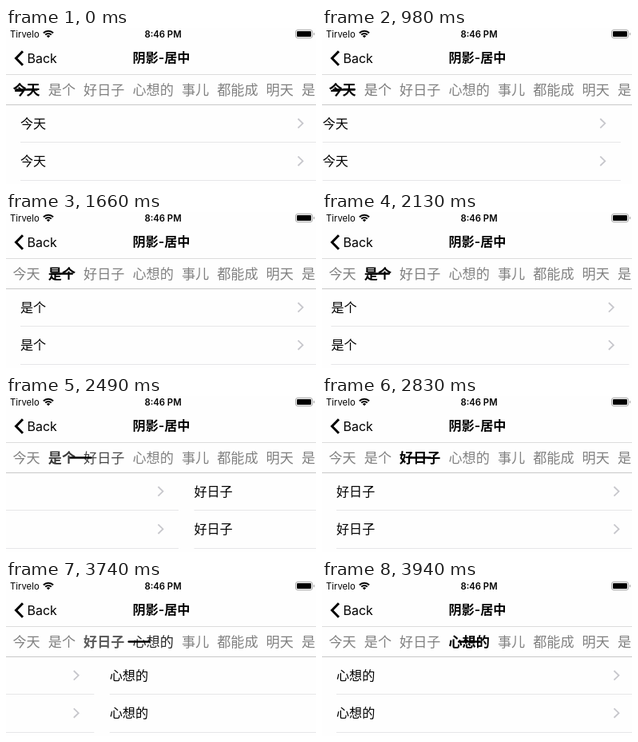
Recreate the animation shown at these times as an HTML page with a canvas. Size 388x196 px, loop 4940 ms.

```html
<!DOCTYPE html>
<html lang="zh">
<head>
<meta charset="utf-8">
<title>阴影-居中</title>
<style>
  html, body { margin: 0; width: 100%; height: 100%; overflow: hidden; background: #fefefe; }
  canvas { display: block; width: 388px; height: 196px; }
</style>
</head>
<body>
<canvas id="stage"></canvas>
<script>
const W = 388, H = 196, PAGE = 392.5, LOOP = 4940;
const FONT = 'Inter, "Noto Sans CJK SC", "Noto Sans CJK", sans-serif';
const EM = 17.1, GAP = 10.1, BAR = 28.5, GRAY = 128;

const canvas = document.getElementById('stage');
const ctx = canvas.getContext('2d');
const dpr = window.devicePixelRatio || 1;
canvas.width = W * dpr;
canvas.height = H * dpr;

let left = 8.5;
const tabs = ['今天', '是个', '好日子', '心想的', '事儿', '都能成', '明天', '是'].map(label => {
  const width = label.length * EM;
  const tab = { label, x: left, mid: left + width / 2 };
  left += width + GAP;
  return tab;
});

const drag = u => u ** 2.8;
const settle = u => 1 - (1 - u ** 1.5) ** 3;

// Each swipe: a quick drag, a pause, then the page settles.
const swipes = [
  { pull: [980, 1040, 2], hold: 120, release: [1300, 1660, 10] },
  { pull: [2080, 2190, 3], hold: 143.5, release: [2490, 2830, 8] },
  { pull: [3190, 3310, 3], hold: 148, release: [3630, 3940, 8] }
];

function progress(t, [start, end, steps]) {
  if (t < start) return 0;
  if (t >= end) return 1;
  return (Math.floor((t - start) / (end - start) * (steps - 1) + 1e-6) + 1) / steps;
}

function scrollAt(t) {
  return swipes.reduce((sum, s) =>
    sum + s.hold * drag(progress(t, s.pull)) +
    (PAGE - s.hold) * settle(progress(t, s.release)), 0);
}

function text(str, x, y, size, color = '#000', weight = 400, align = 'left') {
  ctx.font = `${weight} ${size}px ${FONT}`;
  ctx.fillStyle = color;
  ctx.textAlign = align;
  ctx.fillText(str, x, y);
}

function rect(x, y, w, h, color) {
  ctx.fillStyle = color;
  ctx.fillRect(x, y, w, h);
}

function chevron(x, y, dx, dy, width, color) {
  ctx.beginPath();
  ctx.moveTo(x - dx, y - dy);
  ctx.lineTo(x, y);
  ctx.lineTo(x - dx, y + dy);
  ctx.lineWidth = width;
  ctx.strokeStyle = color;
  ctx.stroke();
}

function pill(x, y, w, h, r) {
  ctx.beginPath();
  ctx.roundRect(x, y, w, h, r);
}

function statusBar() {
  text('Tirvelo', 5, 12, 11.3);
  ctx.strokeStyle = ctx.fillStyle = '#000';
  ctx.lineWidth = 2;
  for (const r of [8.6, 5.3]) {
    ctx.beginPath();
    ctx.arc(53, 12.3, r, -Math.PI * 0.75, -Math.PI * 0.25);
    ctx.stroke();
  }
  ctx.beginPath();
  ctx.moveTo(53, 12.3);
  ctx.arc(53, 12.3, 3, -Math.PI * 0.75, -Math.PI * 0.25);
  ctx.fill();

  text('8:46 PM', 196.5, 12, 11.3, '#000', 600, 'center');

  ctx.strokeStyle = '#a6a6a6';
  ctx.lineWidth = 1;
  pill(362.5, 2.5, 21, 10, 2.5);
  ctx.stroke();
  ctx.fillStyle = '#000';
  pill(364, 4, 18, 7, 1.3);
  ctx.fill();
  rect(385, 6, 1, 3, '#a6a6a6');
}

function navBar() {
  chevron(12.5, 38, -8.5, 8.7, 3, '#000');
  text('Back', 26.5, 43.7, 16);
  text('阴影-居中', 194.5, 43.4, 16.1, '#000', 600, 'center');
  rect(0, 58, W, 1, '#dcdcdc');
}

function tabBar(pos) {
  const from = Math.floor(pos), part = pos - from;
  tabs.forEach((tab, i) => {
    const near = Math.max(0, 1 - Math.abs(pos - i));
    const c = Math.round(GRAY * (1 - near));
    text(tab.label, tab.x, 84.3, EM, `rgb(${c},${c},${c})`, i === from ? 600 : 400);
  });
  const a = tabs[from].mid, b = tabs[from + 1].mid;
  ctx.fillStyle = '#000';
  pill(a + (b - a) * part - BAR / 2, 76.2, BAR, 2.6, 1.3);
  ctx.fill();
  rect(0, 96, W, 1, '#c8c8c8');
}

function page(label, x) {
  for (const y of [119.8, 167.2]) {
    text(label, x + 18, y + 6, 16.1);
    chevron(x + 371.5, y, 6, 5.8, 1.8, '#c7c7cc');
    rect(x + 18, Math.round(y + 23.5), 373, 1, '#e6e6e8');
  }
}

function draw(t) {
  const scroll = scrollAt(t);
  const pos = Math.round(scroll / PAGE * 1e6) / 1e6;
  const first = Math.floor(pos);
  ctx.setTransform(dpr, 0, 0, dpr, 0, 0);
  rect(0, 0, W, H, '#fefefe');
  for (const i of [first, first + 1]) page(tabs[i].label, i * PAGE - scroll);
  statusBar();
  navBar();
  tabBar(pos);
}

const began = performance.now();
function tick() {
  draw((performance.now() - began) % LOOP);
  requestAnimationFrame(tick);
}
tick();
</script>
</body>
</html>
```
